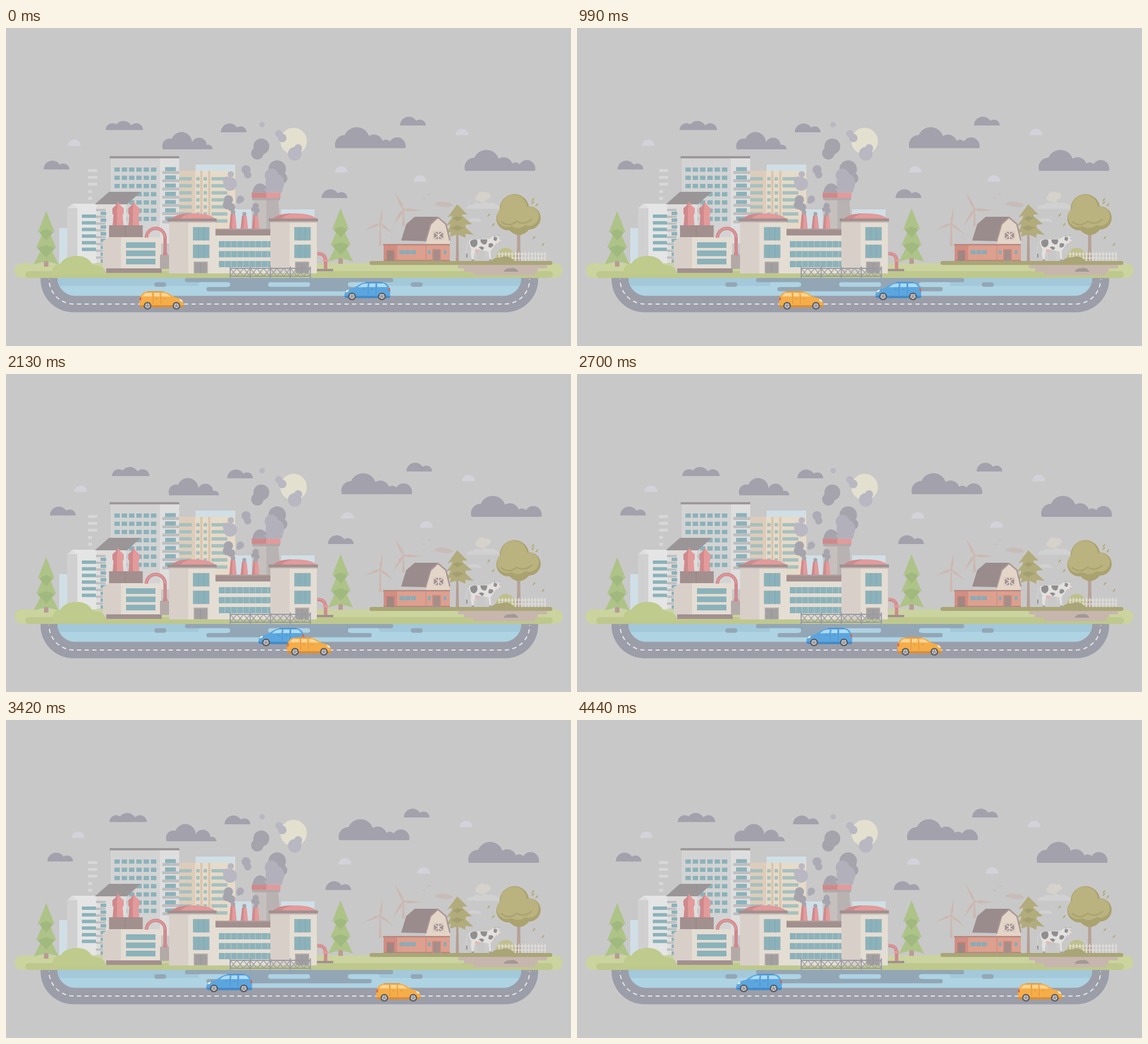
Animation, 998 px wide and 561 px high, one loop 4.51 s. Source, as an HTML page:

```html
<!DOCTYPE html>
<html lang="en">
<head>
<meta charset="utf-8">
<title>City and farm</title>
<style>
html, body { margin: 0; width: 100%; height: 100%; overflow: hidden; background: #c8c8c8; }
svg { display: block; width: 998px; height: 561px; }
</style>
</head>
<body>
<svg id="stage" viewBox="0 0 998 561"></svg>
<script>
const teal = '#8bb2ba', roof = '#a2908f', wall = '#e4ddd4', shade = '#d8cfc9',
  red = '#e39a9b', redDark = '#cf898b', smoke = '#a5a4ad', haze = '#b8b7c2', dusk = '#a2a1ac';

const rect = (x, y, w, h, f, r = 0) => `<rect x="${x}" y="${y}" width="${w}" height="${h}" fill="${f}" rx="${r}"/>`;
const dot = (x, y, r, f) => `<circle cx="${x}" cy="${y}" r="${r}" fill="${f}"/>`;
const path = (d, f) => `<path d="${d}" fill="${f}"/>`;
const line = (d, c, w, extra = '') => `<path d="${d}" fill="none" stroke="${c}" stroke-width="${w}" ${extra}/>`;
const rep = (n, fn) => Array.from({ length: n }, (_, i) => fn(i)).join('');
const at = (x, y, s, extra = '') => `<g transform="translate(${x} ${y}) ${extra}">${s}</g>`;
const rows = (x, y, w, h, n, gap, f) => rep(n, i => rect(x, y + i * gap, w, h, f));
const puffs = (f, ...list) => list.map(([x, y, r]) => dot(x, y, r, f)).join('');

function clouds() {
  const flat = (f, ...list) => `<g clip-path="url(#sky)">${puffs(f, ...list)}</g>`;
  const small = flat(dusk, [16, 0, 15.5], [35.5, 0, 10.5]);
  const wide = flat(dusk, [12, 0, 12], [31.5, 0, 16], [54, 0, 12]);
  const medium = flat(dusk, [13, -6, 13], [34, -12, 18.5], [65, -7, 13.5], [81, 0, 8]) + rect(1, -6, 80, 6, dusk);
  const large = flat(dusk, [17, -6, 17], [38.5, -14, 23], [69, -8, 16], [90, -5, 10], [110, -4, 15]) + rect(1, -5, 123, 5, dusk);
  const pale = flat('#d3d2da', [11.2, 0, 11.2]);
  const put = (shape, ...spots) => spots.map(([x, y]) => at(x, y, shape)).join('');
  return '<clipPath id="sky"><rect x="-5" y="-60" width="150" height="60"/></clipPath>' +
    put(small, [66, 249.5], [379, 184], [557, 300], [695.5, 172]) +
    put(large, [581, 212], [810, 252]) + put(wide, [176, 180]) + put(medium, [276, 214]) +
    put(pale, [109.5, 208], [581, 255], [720, 271], [794.5, 189]);
}

function ground() {
  const grey = '#93a6b5', light = '#aed3e3';
  return path('M61 441H940V443A58 58 0 0 1 882 501.5H119A58 58 0 0 1 61 443Z', '#9b9ea8') +
    line('M76 443A44 44 0 0 0 120 487H881A44 44 0 0 0 925 443', '#e4e6ea', 2, 'stroke-dasharray="7.5 6" stroke-dashoffset="6.75"') +
    path('M91 441H910V442A31 31 0 0 1 879 472.500H122A31 31 0 0 1 91 442Z', light) +
    path('M91 441H910Q910 449 907 455H94Q91 449 91 441Z', '#a3c8d9') +
    rect(316, 441, 368, 7.5, grey, 3.7) + rect(390, 447, 220, 11, grey) +
    rect(354, 457, 292, 7.5, grey, 3.7) +
    rect(340, 448.500, 56, 8, light, 4) + rect(463, 448.500, 74, 8, light, 4) + rect(604, 448.500, 56, 8, light, 4) +
    rect(262, 448.500, 21, 8, grey, 4) + rect(715, 448.500, 21, 8, grey, 4) +
    rect(15, 415, 968, 26, '#cbd39f', 13) + rect(34, 429, 932, 12, '#bec88d', 6);
}

function fir(x, y) {
  const light = '#adc387', dark = '#a1b87f';
  return at(x, y, path('M-4 80H4V98H-4Z', '#b79d92') +
    path('M0 50L22 94L0 88L-22 94Z', light) + path('M-15 66L0 82L15 66L0 55Z', dark) +
    path('M0 24L18 66L0 60L-18 66Z', light) + path('M-12 38L0 52L12 38L0 28Z', dark) +
    path('M0 0L15 38L0 32L-15 38Z', light));
}

function towers() {
  const pale = '#d0dfe6', beigeGlass = '#a5c0bf';
  return rect(94, 353, 16, 62, pale) + rect(335, 241, 70, 110, pale) +
    rect(404, 320, 30, 36, pale) + rect(486, 320, 59, 17, pale) +
    rows(145, 249, 16, 5, 3, 12, '#d7d7d8') + rows(145, 286, 7, 5, 2, 12, '#d7d7d8') +
    // beige block
    rect(305, 252, 31, 102, '#deccba') + rect(334, 252, 71, 102, '#e6dac8') +
    rect(343, 252, 4, 102, '#d9c6ae') + rect(357, 252, 4, 102, '#d9c6ae') +
    rows(306, 263, 22, 6, 7, 12.4, beigeGlass) + rows(336, 263, 6, 6, 7, 12.4, beigeGlass) +
    rows(349, 263, 6, 6, 7, 12.4, beigeGlass) + rows(363, 263, 28, 6, 7, 12.4, beigeGlass) +
    // grey high-rise
    rect(185, 230, 87, 150, '#d3d3d3') + rect(272, 230, 34, 150, '#dedede') +
    rect(183, 226, 123, 4, '#9c9899') +
    rep(6, i => rows(191.500 + i * 12.9, 246, 9.5, 7.5, 7, 14.5, teal)) +
    rows(281, 245.500, 19, 7, 7, 14.5, teal) + rows(276, 252.500, 30, 5, 7, 14.5, '#bfbebf') +
    // white block
    path('M108 318L117 310H160V415H108Z', '#d0d0d1') + path('M108 318L117 310H160V318Z', '#dddddd') +
    path('M117 310H160V415H126V318Z', '#e4e5e4') + rows(134, 329, 25, 6, 6, 11.7, teal) +
    // sloped roof house
    path('M160 310H213V372H160Z', '#dedddc') +
    rect(160, 310, 22, 104, '#dedddc') + rows(167, 324, 10, 6, 8, 12, teal) + rows(159, 319, 17, 4, 8, 12, '#c0bfbf') +
    path('M157 311L182 289H238L214 311Z', '#9a9697');
}

function silo(x) {
  return at(x, 306, path('M0 0Q3 7 10 12V21L8 24L9.500 42H-9.500L-8 24L-10 21V12Q-3 7 0 0Z', red) +
    path('M0 0Q-3 7-10 12V21L-8 24L-9.500 42H-2V14Z', redDark));
}

function stack(x, h) {
  return path(`M${x - 4} ${354 - h}H${x + 4}L${x + 6.5} 354H${x - 6.5}Z`, red) +
    path(`M${x - 4} ${354 - h}H${x - 1}L${x - 1.5} 354H${x - 6.5}Z`, redDark);
}

function wing(x) {
  const pane = y => rect(x + 45, y, 29.5, 24, '#a5b9b9') + rect(x + 46, y + 1, 27.5, 22, teal) +
    line(`M${x + 55} ${y}v24M${x + 64.5} ${y}v24`, '#80a7af', 1);
  return rect(x + 3, 342, 35, 91, shade) + rect(x + 37, 342, 48, 91, wall) +
    path(`M${x + 7} 337Q${x + 16} 327 ${x + 46} 327Q${x + 76} 327 ${x + 85} 337Z`, red) +
    path(`M${x + 7} 337Q${x + 16} 327 ${x + 42} 327Q${x + 26} 331 ${x + 23} 337Z`, redDark) +
    rect(x, 336, 87, 5.5, roof) + rect(x + 3, 341.500, 82, 2, '#cac0b9') + pane(351) + pane(382) +
    rect(x + 46.5, 412, 25, 20.5, '#b5adaa') + rect(x + 48, 414, 22, 18.5, '#a29fa0') +
    line(`M${x + 59} 414v18`, '#949193', 1);
}

function factory() {
  const fence = '#999ba2';
  return silo(198) + silo(226) + rect(182, 348, 59.500, 22, roof) + rect(210, 348, 1, 22, '#93827f') +
    path('M171 376L182 369H210V432H171Z', shade) + rect(203, 369, 71, 56, wall) +
    rect(177, 424, 98, 8, roof) + rows(212, 378, 52, 10, 3, 14.5, teal) +
    rect(272, 400, 16, 25, '#b3aaa8') +
    line('M248 370A16.500 16.500 0 0 1 281 370V400', redDark, 6) +
    line('M248 370A16.500 16.500 0 0 1 281 370', red, 2) +
    rect(277, 396, 8, 5, redDark) +
    // tall chimney
    path('M438 303H460V354H434Z', '#c5c0be') + path('M460 303H481L485 354H460Z', '#b8b3b2') +
    rect(435, 298, 49, 6, '#b1a9a9') + rect(434, 290.500, 51, 9, red) + rect(434, 290.500, 26, 9, redDark) +
    stack(401, 26) + stack(421, 23) + stack(441, 25) +
    // middle hall
    rect(369, 360, 115, 73, wall) + rect(370, 354, 113, 12, roof) + rect(370, 354, 113, 2, '#b19e9c') +
    rep(3, r => rect(376, 376 + r * 17.5, 97, 11, teal) +
      rep(8, i => rect(386 + i * 10.8, 376 + r * 17.5, 1.2, 11, '#b0c4c4'))) +
    wing(285) + wing(464) +
    line('M550 398Q564 397 564.500 411V425', redDark, 6) + line('M550 397Q562 396 564 407', red, 2) +
    rect(560, 408, 9, 4, red) + rect(549, 425, 29, 4, roof) +
    line('M395 424H538M395 438H538', fence, 2) +
    rep(5, i => rect(395 + i * 35.4, 420.500, 2, 20.500, fence)) +
    rep(12, i => line(`M${396 + i * 11.8} 424l11.8 14m-11.8 0l11.8-14`, fence, 1.2));
}

const fumes = () => puffs(smoke, [479, 249, 15.5], [487, 265, 10], [451, 209, 14], [444, 221, 11]) +
  path('M435 290.500Q438 274 450 274Q462 277 465 290.500Z', smoke) +
  puffs('#b2b1bb', [469, 260, 12], [475, 273, 16.500]) + path('M456 284L491 276L487 290.500H461Z', '#b2b1bb') +
  puffs(haze, [510, 222, 12], [516, 212, 7], [488, 194, 7.5], [482, 186.500, 6.5], [452.500, 170.500, 4.8],
    [396, 275, 12], [397, 258, 5.5], [390, 269, 7]) +
  puffs('#acabb5', [424, 250, 8], [427, 259, 6.5], [414, 302, 6.5], [411, 306, 4]) +
  puffs(smoke, [393, 303, 8], [391, 312, 8], [398, 316, 7], [401, 325, 4], [421, 328, 3.5], [441, 314, 5.5], [437, 320, 4], [443, 322, 5], [441, 328, 3.5]);

function turbine(x, y, a, s, h) {
  const blade = 'M0 0L2.800-8L0-32L-2.200-8Z', c = '#ccb8b0';
  return at(x, y, path(`M-1 0H1L2.500 ${h}H-2.500Z`, c) +
    rep(3, i => `<g transform="rotate(${a + i * 120}) scale(${s})">${path(blade, c)}</g>`) + dot(0, 0, 2.5, c));
}

function farm() {
  const olive = '#a9a577', needle = '#b2ab7b', needleDark = '#a49f70', leaf = '#bab27f', leafDark = '#aaa26f';
  return turbine(661, 345, 8, .95, 40) + turbine(702, 320, -27, 1.08, 30) +
    line('M735 302l3-3 2 3M744 295l3-3 3 1', '#b9b1ae', .8) +
    path('M756 311Q764 304 774 307Q786 306 790 314Q774 319 756 311Z', '#c8bcb8') +
    puffs('#d4d2cb', [841, 298, 9.5], [850, 296, 6], [834, 300, 5]) +
    path('M813 319Q815 311 825 312Q829 306 838 310Q846 305 852 309Q866 306 874 318V319Z', '#d2d1d1') +
    path('M815 341Q820 334 828 336Q838 335 840 342Z', '#d2d1d1') +
    // pine
    path('M795.500 358H799L800 411H794.500Z', '#b49d93') +
    path('M797 338L826 365L812 363L811 370L798 364L784 368L786 360L774 363Z', needle) +
    path('M784 352L797 358L812 351L803 343Z', needleDark) +
    path('M797 324L823 346L812 347L811 353L797 348L783 354L785 346L777 349Z', needle) +
    path('M788 335L797 341L808 334L801 327Z', needleDark) +
    path('M797 311L815 329L806 329L807 335L797 332L787 337L788 331L780 334Z', needle) +
    // broadleaf tree
    line('M898 352L905 366M913 354L906 368', '#b7a197', 3) + path('M902 350H908L909 411H901Q904 385 902 350Z', '#b7a197') +
    puffs(leafDark, [898, 319, 26], [887, 336, 21], [924, 335, 20.5], [906, 344, 21]) +
    puffs(leaf, [897, 317, 23], [885, 333, 18], [924, 332, 17], [904, 334, 19]) +
    line('M874 341Q888 353 902 341Q915 349 929 337', leafDark, 2.5) +
    rep(7, i => path(`M${[928, 935, 850, 858, 930, 946, 928][i]} ${[311, 315, 333, 350, 373, 385, 306][i]}q1-5 5-6q0 4-5 6`, '#b1aa73')) +
    // barn
    path('M667 383H784V411H667Z', '#dd9f8e') + rect(667, 383, 24, 28, '#d08e84') +
    path('M741 382L744 352L762 334L777 346L784 376V383H741Z', '#e3d5c7') +
    path('M698 375L707 346L722 333H763L750 345L741 376Z', '#9a8b8d') +
    line('M741 377L750 346L763 334L777 346L784 375', '#aa9493', 2.4) +
    rect(666, 381, 118, 2.500, '#b78780') + rect(667, 409, 117, 2, '#b78780') +
    rect(741, 383, 1.500, 28, '#c98f84') +
    rect(754, 358, 20, 16, '#a5918f') + line('M755 359H773V373H755ZL773 373M773 359L755 373M764 359V373', '#e7ddd3', 1.500) +
    rect(672, 392, 14, 19, '#c07d76') + rect(674, 394, 10, 17, '#9c8782') +
    rect(695, 392, 29, 7, '#89abb7') + line('M705 392v7M714.500 392v7', '#c9a79d', 1) +
    rect(745, 392, 5, 7, '#89abb7') + rect(773, 392, 5, 7, '#89abb7') +
    rect(753, 390, 15, 21, '#c78b80') + rect(755, 392, 11, 19, '#a48e8b') +
    // yard
    path('M864 411Q866 389 883 388Q899 389 902 411Z', '#bfbf89') +
    rect(642, 411, 323, 7, olive, 3.5) + rect(798, 418, 158, 6, '#c6b6ad', 3) +
    rect(809, 423, 130, 7, '#c6b6ad') + rect(825, 429, 110, 7, '#c6b6ad', 3.5) +
    path('M879 430Q882 423 890 424Q901 421 905 430Z', '#a39894') +
    rep(15, i => path(`M${870 + i * 5.800} 411V396l1-2l1 2V411Z`, '#e0ddd7')) +
    rect(868, 398, 86, 1.500, '#e0ddd7') + rect(868, 405, 86, 1.500, '#e0ddd7') +
    path('M856 412Q864 403 874 405Q888 398 899 412Z', olive) + cow();
}

function cow() {
  const white = '#e3e1df', spot = '#918e8f';
  return line('M819 375Q811 382 814 402', '#d6d3d1', 1.300) + line('M814 398v7', spot, 2) +
    path('M846 390L848 410H850.500L851 390ZM826 390L829 410H831.500L832 390Z', '#cfcccb') +
    path('M818 376Q821 372 829 373L853 372L861 367L866 368L873 367L870 371L875 377L872 380L866 379L860 388L856 394L857 410H854L852 394L840 392L832 391L827 398L826 410H823L821 398L822 390Q818 384 818 376Z', white) +
    path('M820 376Q826 371 832 374Q835 384 827 387Q819 386 820 376ZM838 373H850Q850 382 845 382Q838 381 838 373ZM853 380Q860 378 861 383Q857 390 852 386ZM835 387Q840 383 845 388L841 392ZM862 368L868 370L866 376L861 374Z', spot) +
    path('M828 391Q833 389 837 392Q834 398 829 396Z', '#dfb9b5') + path('M870 376L875 377L873 380L870 380Z', '#dab9b3') +
    line('M864 368L862 365M870 368L872 365', '#aaa2a0', 1) + rect(853.500, 408.500, 4, 2, spot) + rect(822.500, 408.500, 4, 2, spot);
}

function car(body, dark, glass) {
  const wheel = x => at(x, 26, dot(0, 0, 6.8, '#58585c') + dot(0, 0, 4.500, '#d9d9dc') +
    rep(5, i => `<path d="M0 -1.300V-4" stroke="#7b7b80" stroke-width="1.500" transform="rotate(${i * 72})"/>`) + dot(0, 0, 1, '#77777b'));
  return path('M1 22Q0 13 3 9Q6 2 13 1Q28-.5 42 1Q50 2 55 6L63 11Q74 13 77 17Q79 20 79 26Q78 29 74 29H4Q0 28 1 22Z', body) +
    path('M1 25H79V26Q78 29 74 29H4Q0 28 1 25Z', dark) +
    path('M6 9.500Q9 4 13 3.200H23V9.500ZM26 3.200H36L37 9.500H26ZM39 3.200Q47 3.200 51 6L56 10L40 9.500Z', glass) +
    line('M25 3V23M38.500 10V23', dark, .8) + line('M14 1.200H43', dark, 1.200) +
    rect(29, 13, 4, 1, dark) + rect(43, 13, 4, 1, dark) +
    path('M71 14Q77 15 77 19L73 18Z', '#edf1ee') + path('M1 12L4 11V16L1 17Z', '#dd6350') +
    wheel(15) + wheel(66);
}

document.getElementById('stage').innerHTML =
  rect(0, 0, 998, 561, '#c8c8c8') + `<g id="clouds">${clouds()}</g>` + dot(508, 199.500, 23.500, '#e3e0cf') +
  ground() + towers() + factory() + fumes() + farm() +
  fir(71, 323) + fir(591, 318) +
  path('M82 436Q81 416 96 416Q104 402 125 402Q145 402 153 418Q176 418 177 436Z', '#bfca8d') +
  `<g id="blue">${at(82, 0, car('#5ca6df', '#4389c6', '#addbf4'), 'scale(-1.035 1)')}</g>` +
  `<g id="orange">${car('#f4ad48', '#db8d36', '#fad596')}</g>`;

const LOOP = 4510, STEP = 30, LAST = 4440, TURN = 2260;
const move = (id, x, y) => document.getElementById(id).setAttribute('transform', `translate(${x.toFixed(2)} ${y})`);

function draw(now) {
  const t = Math.min(LAST, Math.floor(now % LOOP / STEP) * STEP);
  const drift = t < TURN ? t * .00527 : 11.9 - (t - TURN) * .00454;
  move('clouds', drift, 0);
  move('blue', 597.5 - t * .0713, 447.500);
  move('orange', 235 + t * .1223, 464);
}

function tick() {
  draw(performance.now());
  requestAnimationFrame(tick);
}
tick();
</script>
</body>
</html>
```
